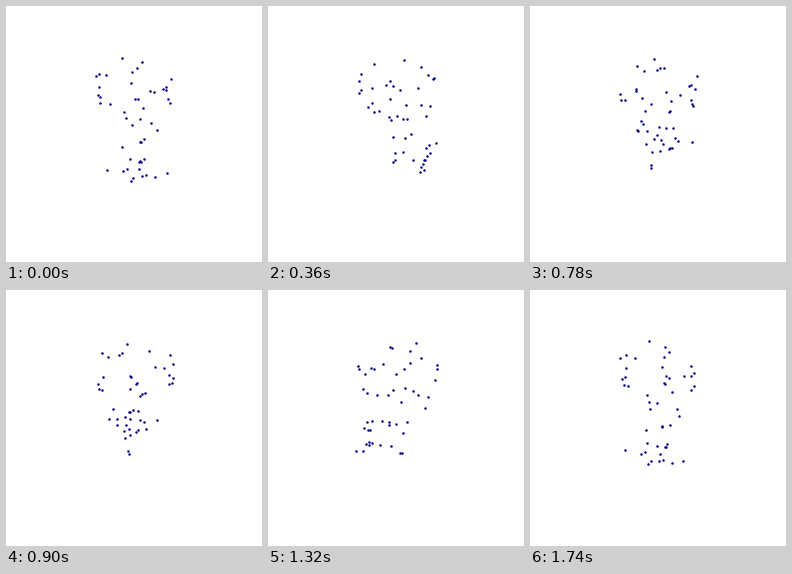
Write a matplotlib script that moves like this. It is 256 px wide and 256 px high and loops after 1.8 s.

```python
import numpy as np
import matplotlib.pyplot as plt
from matplotlib.animation import FuncAnimation

SIZE, DPI = 256, 100
FRAMES, INTERVAL = 30, 60
CENTER = 128
TILT = 0.5            # sine of the camera elevation
PERSPECTIVE = 1 / 290

# Each point: right, towards the camera, down (relative to the centre).
POINTS = np.array([
    # upper ring
    (-13.8, -18.5, -72.3), (7.8, 5.8, -73.5), (3.4, -40.5, -55.6),
    (-2.3, -40.5, -50.5), (-4.5, -38.5, -38.6), (-37.3, -11, -57.8),
    (-37, 8.5, -60.7), (-31.4, -24, -52), (-37.3, -11, -44.3),
    (-36.6, -4.5, -37.6), (-31.8, 19, -44.1), (-34.5, 4, -32.6),
    (-22.4, 30, -41.9), (33.9, 17, -60.4), (34, -18.5, -41.8),
    (30.2, -22.5, -37.3), (29.1, 26, -53.9), (14, 35.5, -56),
    (16.8, 34, -54.1), (34.8, -7.5, -32.2), (33.4, 13.5, -37),
    # middle
    (1.1, -31.5, -23.2), (4.1, -8.5, -32.8), (8.8, -28, -15.6),
    (-10.8, 4.3, -24), (-7.8, 9.3, -20.2), (-1.8, 30, -23.2),
    (5.3, 33, -30.6), (16.7, -12, -5.5), (21.7, 5, -7.3),
    # lower part
    (4.9, 7, 4.3), (6, 13.7, 0), (10.2, -7, 8.6),
    (-12, 2, 11.9), (-3.6, 31, 6.8), (5.3, 31.7, 8.1),
    (5, -5.8, 31.4), (6.5, -4.2, 30), (9.7, 4.3, 22),
    (-25, 30, 16.4), (-10, 29.3, 18.6), (-6.3, 30, 16.2),
    (4.7, 15.7, 25.2), (6.4, 27, 24.5), (9.9, 29, 21.5),
    (18.8, 30.3, 22.8), (29, 34, 17.4), (-1.8, 25, 26.8),
    (-3.6, 29, 27.5),
])


def project(angle):
    """Turn the cloud about its vertical axis and return screen x, y."""
    right, near, down = POINTS.T
    c, s = np.cos(angle), np.sin(angle)
    x, depth = right * c + near * s, near * c - right * s
    scale = 1 / (1 - PERSPECTIVE * depth)
    return CENTER + scale * x, CENTER + scale * (down + TILT * depth)


fig = plt.figure(figsize=(SIZE / DPI, SIZE / DPI), dpi=DPI, facecolor="white")
ax = fig.add_axes([0, 0, 1, 1])
ax.set(xlim=(-0.5, SIZE - 0.5), ylim=(SIZE - 0.5, -0.5))
ax.axis("off")

dots, = ax.plot([], [], "o", color="#00008b", markersize=2.5 * 72 / DPI,
                markeredgewidth=0)


def update(frame):
    dots.set_data(*project(2 * np.pi * frame / FRAMES))
    return dots,


anim = FuncAnimation(fig, update, frames=FRAMES, interval=INTERVAL,
                     repeat=True, repeat_delay=0)
plt.show()
```
